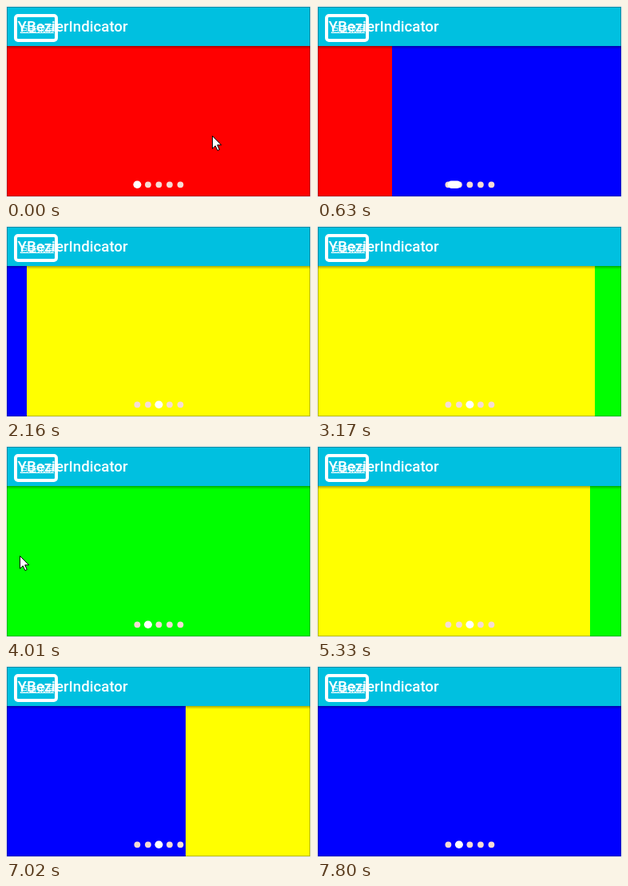
An HTML page that plays this animation: 382x240 px, repeating every 8.73 s.

```html
<!DOCTYPE html>
<html lang="en">
<head>
<meta charset="utf-8">
<title>YBezierIndicator</title>
<style>
  html, body { margin: 0; width: 100%; height: 100%; overflow: hidden; background: #eee; }
  svg { display: block; width: 382px; height: 240px; }
  .title { font: 500 18.7px Roboto, sans-serif; fill: #fff; }
  .badge { font: 11px "Noto Sans CJK SC", "Noto Sans CJK", sans-serif; fill: #fff; }
</style>
</head>
<body>
<svg viewBox="0 0 382 240">
  <defs>
    <clipPath id="view"><rect x="1" y="50" width="380" height="188"/></clipPath>
    <linearGradient id="shade" x2="0" y2="1">
      <stop stop-opacity=".32"/>
      <stop offset="1" stop-opacity="0"/>
    </linearGradient>
  </defs>
  <g clip-path="url(#view)"><g id="pages"></g></g>
  <rect x="1" y="1" width="380" height="49" fill="#00c0e0"/>
  <rect x="1" y="50" width="380" height="4" fill="url(#shade)"/>
  <rect x="1.5" y="1.5" width="379" height="236" fill="none" stroke="#000" stroke-opacity=".28"/>
  <text class="title" x="14.5" y="32">YBezierIndicator</text>
  <rect x="12" y="12" width="51" height="31" rx="3" fill="none" stroke="#fff" stroke-width="4"/>
  <text class="badge" x="17" y="32.5">点击录屏</text>
  <path d="M18 33.5h42" stroke="#fff"/>
  <g id="dots" fill="#f6dcd4"></g>
  <path id="active" stroke="#fff" stroke-width="9.4" stroke-linecap="round"/>
  <path id="cursor" d="M.5.5V16.2L4.2 12.8 6.9 18.6 9.3 17.5 6.7 11.8H11.7Z" fill="#fff" stroke="#000"/>
</svg>
<script>
const LOOP = 8730, TICK = 77, WIDTH = 380, SETTLE = 320, DOT_Y = 223.3;
const $ = id => document.getElementById(id);

// A page is dragged evenly to `reach`, dropped, then eases into place.
const swipes = [
  { start: 300, drop: 540, reach: .45, from: 0, to: 1 },
  { start: 1740, drop: 1990, reach: .4, from: 1, to: 2 },
  { start: 3063, drop: 3680, reach: .57, from: 2, to: 3 },
  { start: 4920, drop: 5171, reach: .4, from: 3, to: 2 },
  { start: 6620, drop: 6978, reach: .455, from: 2, to: 1 }
];
// The pointer glides from `a` to `b` until `arrive`, then rests until `hide`.
const pointers = [
  { show: 0, hide: 300, b: [258, 162] },
  { show: 1170, arrive: 1690, hide: 1770, a: [237, 123], b: [133.5, 122] },
  { show: 2700, hide: 3063, b: [223, 140] },
  { show: 3465, hide: 4920, b: [17, 137] },
  { show: 5790, arrive: 6310, hide: 6690, a: [370, 209], b: [150, 147] },
  { show: 7460, hide: 7770, b: [368, 206] }
];

const clamp = v => Math.min(1, Math.max(0, v));
const mix = (a, b, u) => a + (b - a) * u;
const easeOut = u => 1 - (1 - u) ** 3;
const dotX = i => 164.4 + 13.5 * i;
const dotOf = page => 2 - Math.abs(page - 2);

function svg(tag, attrs, parent) {
  const el = document.createElementNS("http://www.w3.org/2000/svg", tag);
  for (const k in attrs) el.setAttribute(k, attrs[k]);
  parent.append(el);
}

["#f00", "#00f", "#ff0", "#0f0"].forEach((fill, i) =>
  svg("rect", { x: 1 + i * WIDTH, y: 50, width: WIDTH, height: 188, fill }, $("pages")));
for (let i = 0; i < 5; i++) svg("circle", { cx: dotX(i), cy: DOT_Y, r: 3.9 }, $("dots"));

function drawPages(t) {
  const s = swipes.findLast(s => s.start <= t) || swipes[0];
  const drag = s.reach * clamp((t - s.start) / (s.drop - s.start));
  const moved = mix(drag, 1, easeOut(clamp((t - s.drop) / SETTLE)));
  const x = -Math.round(WIDTH * mix(s.from, s.to, moved));
  $("pages").setAttribute("transform", `translate(${x})`);

  // Past the middle the dot stretches: its head leads, its tail catches up.
  const u = clamp((moved - .6) / .28);
  const at = v => dotX(mix(dotOf(s.from), dotOf(s.to), v));
  const ends = [at(1 - (1 - u) ** 2), at(u * u)].sort((a, b) => a - b);
  $("active").setAttribute("d", `M${ends[0] - .3} ${DOT_Y}H${ends[1] + .3}`);
}

function drawCursor(t) {
  const p = pointers.find(p => t >= p.show && t < p.hide);
  $("cursor").style.display = p ? "" : "none";
  if (!p) return;
  const u = p.a ? clamp((t - p.show) / (p.arrive - p.show)) : 1;
  const pos = p.b.map((v, i) => mix(p.a ? p.a[i] : v, v, u));
  $("cursor").setAttribute("transform", `translate(${pos})`);
}

const begin = performance.now();
function draw() {
  const t = Math.floor((performance.now() - begin) % LOOP / TICK) * TICK;
  drawPages(t);
  drawCursor(t);
  requestAnimationFrame(draw);
}
draw();
</script>
</body>
</html>
```
